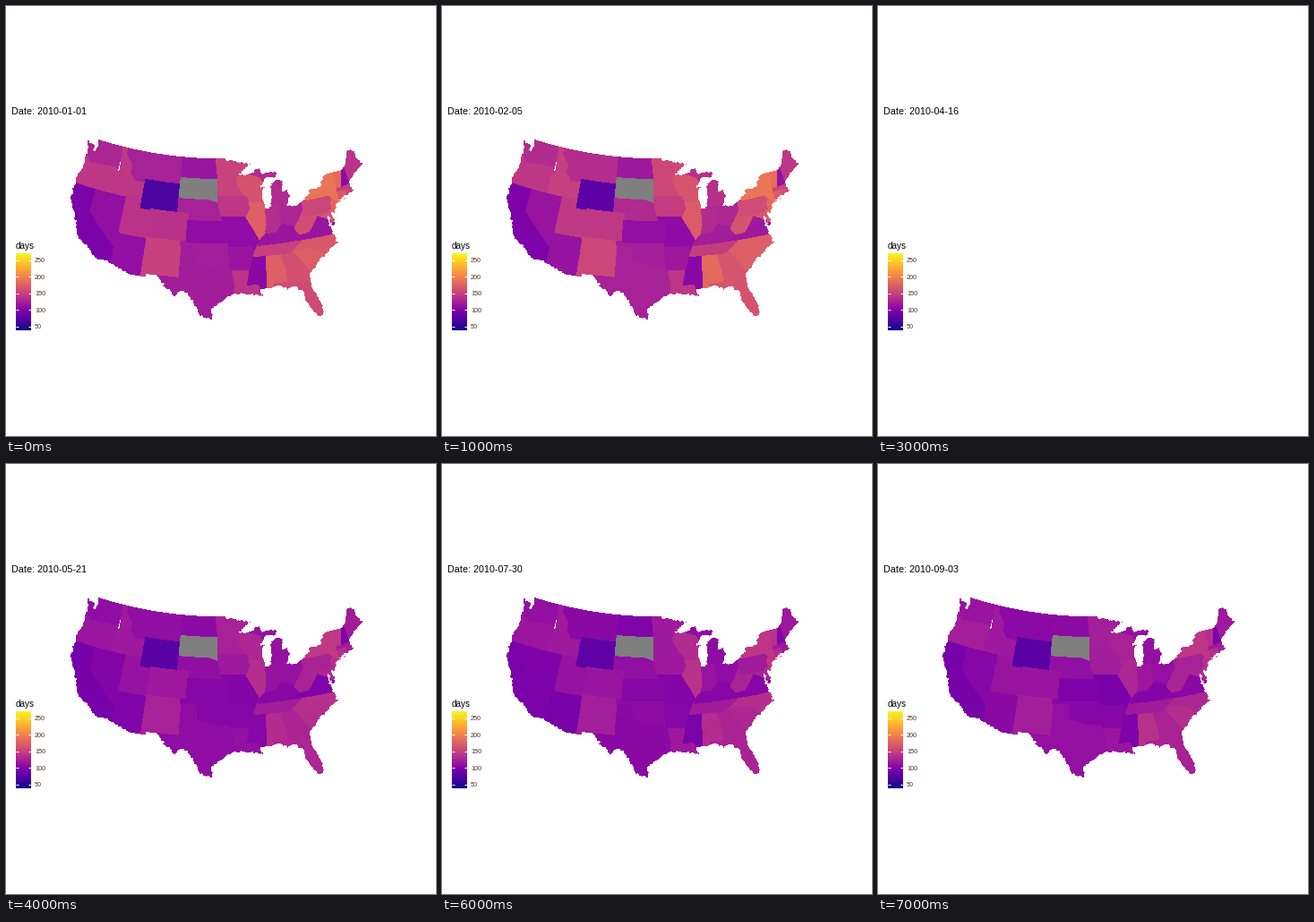
Recreate the animation shown at these times as a matplotlib script. Size 480 px wide and 480 px high, loop 8 s.

```python
import numpy as np
import matplotlib.pyplot as plt
from matplotlib.animation import FuncAnimation
from matplotlib.patches import PathPatch, Polygon
from matplotlib.path import Path

SIZE = 480
LOW, HIGH = 36.5, 269
STEPS = 8
BLANK = 3      # step without any data
PLASMA = plt.get_cmap("plasma")
rng = np.random.default_rng(4)

plt.rcParams["font.family"] = "Liberation Sans"
fig = plt.figure(figsize=(SIZE / 72, SIZE / 72), dpi=72, facecolor="white")
ax = fig.add_axes([0, 0, 1, 1])
ax.axis("off")


def albers(west, lat):
    """Equal-area conic projection to stage pixels, parallels 39 and 45."""
    s1, s2 = np.sin(np.radians([39, 45]))
    n = (s1 + s2) / 2
    c = 1 - s1 ** 2 + 2 * n * s1
    rho = 453 * np.sqrt(c - 2 * n * np.sin(np.radians(lat))) / n
    theta = n * np.radians(95.84 - west)
    return 240.6 + rho * np.sin(theta), rho * np.cos(theta) - 278


def trace(coords, rough=0):
    """Project a ring of (west, north) pairs; rough shakes slanted edges."""
    pts = np.array(coords, float).reshape(-1, 2)
    out = []
    for a, b in zip(pts, np.roll(pts, -1, axis=0)):
        shake = rough if np.abs(b - a).min() > 0 else 0
        steps = int(np.ceil(np.abs(b - a).max() / 0.25))
        for k in range(steps):
            out.append(albers(*(a + (b - a) * k / steps))
                       + rng.normal(0, shake, 2) * (k > 0))
    return out


def yearly(base):
    """Day counts per step: a slow winter rise, then a flatter, lower spread."""
    step = np.arange(STEPS)
    days = np.where(step < BLANK, base + 3 * step, 42 + 0.52 * base)
    return days + rng.normal(0, 2.5, STEPS) * (step > 0)


regions = []


def state(base, *coords):
    """Painted over its neighbours so far; the sea is cut away afterwards."""
    patch = ax.add_patch(Polygon(trace(coords), lw=0.5, antialiased=False))
    regions.append((patch, None if base is None else yearly(base)))


def box(base, w, s, e, n):
    state(base, w, n, e, n, e, s, w, s)


# West
box(140, 125, 42, 117, 47)
state(126, 125, 46.2, 123, 46.1, 122.8, 45.6, 119.3, 45.9, 117, 46, 117, 50, 125, 50)
box(108, 115, 31, 109.05, 37)
state(93, 125, 42, 120, 42, 120, 39, 114.6, 35, 114.5, 33, 114.7, 32, 125, 32)
box(122, 116.05, 44.4, 104.05, 50)
state(140, 117.04, 50, 116.05, 50, 116.05, 48, 114.4, 46.6, 114.5, 45.6,
      113.2, 44.5, 111.05, 44.5, 111.05, 42, 117.04, 42, 117, 44.2, 116.5, 45.6)
state(108, 120, 42, 114.04, 42, 114.04, 36.1, 114.7, 36, 114.6, 35, 120, 39)
box(137, 114.04, 37, 109.05, 42)
box(66, 111.05, 41, 104.05, 45)

# Plains
box(112, 104.05, 45.94, 96.6, 50)
box(None, 104.05, 42.6, 96.45, 45.94)
state(122, 104.05, 43, 98.4, 43, 96.4, 42.5, 95.3, 40, 102.05, 40, 102.05, 41,
      104.05, 41)
box(136, 109.05, 37, 102.05, 41)
box(119, 107, 25, 93.6, 36.5)
state(148, 109.05, 37, 103.05, 37, 103.05, 32, 106.6, 32, 106.6, 31, 109.05, 31)
state(120, 103, 37, 94.6, 37, 94.45, 33.7, 97, 33.8, 100, 34.5, 100, 36.5, 103, 36.5)

# Middle
box(130, 90.5, 41.73, 82, 48)
state(150, 97.2, 50, 89, 50, 89, 48, 92.1, 46.7, 92.8, 45.6, 91.2, 43.5,
      96.45, 43.5, 96.5, 46)
state(162, 92.8, 45.6, 92.1, 47, 90.4, 47, 90.4, 46.5, 88.1, 45.9, 87.6, 45.1,
      86.5, 45.1, 86.8, 42.5, 90.6, 42.5, 91.2, 43.5)
state(140, 96.5, 43.5, 91.2, 43.5, 90.2, 41.8, 91.4, 40.4, 95.8, 40.6, 96.4, 42.5)
state(172, 90.6, 42.5, 87, 42.5, 87.53, 39.3, 88, 37.9, 89.2, 37, 90.2, 38.7,
      91.4, 40.3, 90.2, 41.8)
state(132, 87.53, 41.8, 84.82, 41.73, 84.82, 39, 86, 38, 88, 37.9, 87.53, 39.3)
state(126, 84.82, 41.73, 83, 41.73, 80.52, 42.2, 80.6, 40.4, 82.5, 38.5, 84.82, 39.1)
state(112, 94.6, 36.5, 89.7, 36.5, 91.1, 33, 94.04, 33, 94.45, 33.7)
state(106, 95.8, 40.6, 91.6, 40.6, 91.4, 40.3, 90.2, 38.7, 89.2, 37, 89.6, 36,
      90.3, 36, 90.1, 36.5, 94.6, 36.5, 94.6, 39.1)
box(106, 102.05, 37, 94.6, 40)

# South
state(138, 94.04, 33, 91.1, 33, 91.6, 31, 89.7, 31, 89.5, 30, 88, 28, 94, 28, 93.6, 31)
box(156, 87.6, 24, 79, 31)
state(102, 91.1, 33, 90.3, 35, 88.2, 35, 88.4, 30, 89.5, 30, 89.7, 31, 91.6, 31)
state(172, 88.2, 35, 85.6, 35, 85, 32.3, 85, 31, 87.6, 31, 87.5, 30, 88.4, 30)
box(166, 84.3, 33.5, 75, 36.55)
state(160, 85.6, 35, 83.1, 35, 81, 32, 81, 30.6, 85, 30.7, 85, 32.3)
state(171, 83.2, 35, 82.3, 35.2, 81, 35.15, 79.7, 34.8, 78.5, 33.8, 78, 32, 81, 32)
state(148, 90.3, 35, 84.3, 35, 81.7, 36.6, 89.5, 36.5)
box(162, 79.5, 37.9, 75, 39.72)
state(112, 75, 36.55, 83.7, 36.6, 82, 37.5, 80.3, 37.5, 78.4, 39.4, 77, 38.8,
      76, 38, 75, 38)
state(112, 89.4, 36.5, 83.7, 36.6, 82, 37.5, 82.6, 38.5, 84.8, 39.1, 86, 38,
      88, 37.9, 89.2, 37)
state(158, 82.6, 38.3, 81.9, 37.4, 80.3, 37.5, 78.4, 39.4, 79.5, 39.2,
      79.5, 39.72, 80.52, 40.6, 81.7, 39.2)

# Northeast
box(152, 80.52, 39.72, 74.7, 42.3)
box(164, 75.79, 38.45, 75, 39.8)
state(178, 75.5, 39.5, 75.1, 40, 75.2, 40.8, 74.7, 41.35, 73.9, 41, 73.9, 38.8, 75, 38.8)
state(188, 79.76, 46, 73.35, 46, 73.5, 41, 71, 41.2, 72, 40, 73.9, 40.4, 74, 41,
      75.35, 42, 79.76, 42)
box(146, 73.4, 41.2, 69.5, 42.75)
box(168, 73.5, 41.1, 71.8, 42.05)
box(150, 71.8, 41.1, 71.2, 42.02)
state(180, 73.35, 45.1, 71.4, 45.1, 72.5, 42.73, 73.3, 42.73)
state(104, 71.5, 45.1, 71, 45.4, 70.7, 42.9, 72.5, 42.73)
state(138, 71.05, 48, 66, 48, 66, 43, 70.7, 43)

# Shoreline and land border
PACIFIC = [122.76, 49, 122.3, 47.9, 122.8, 47.3, 122.9, 48.1, 124.7, 48.4,
           124, 46.5, 124.1, 43.8, 124.5, 42.8, 124.2, 41.8, 124.35, 40.4,
           123.75, 39.2, 122.5, 37.7, 121.9, 36.7, 120.65, 34.6, 119.2, 34.15,
           117.12, 32.53]
SOUTH = [114.8, 32.5, 111.07, 31.33, 108.2, 31.33, 108.2, 31.78, 106.5, 31.78,
         104.7, 30, 103.15, 28.98, 102.4, 29.85, 101.4, 29.77, 100.3, 28.3,
         99.1, 26.4, 97.15, 25.95, 97.3, 27.6, 95.2, 29, 93.8, 29.7, 91.8, 29.5,
         89.2, 29.1, 89.5, 30.2, 86.3, 30.4, 85.3, 29.7, 84, 30.1, 82.8, 29,
         82.8, 27.8, 81.1, 25.15]
ATLANTIC = [80.3, 25.3, 80.05, 26.8, 81.3, 29.8, 81.3, 31.5, 79.3, 33.1,
            78, 33.9, 76.6, 34.7, 75.55, 35.25, 76, 36.9, 76.4, 39.2, 75.9, 37.3,
            75.1, 38.4, 75.5, 39.5, 74.9, 39, 74, 40.5, 72, 41, 73.6, 40.95,
            71.4, 41.4, 70, 41.65, 70.8, 42.4, 70.7, 43, 69, 44, 67, 44.8]
NORTH = [67.8, 45.7, 67.9, 47.1, 69.2, 47.45, 70, 46.7, 71, 45.3, 71.5, 45,
         75, 45, 76.3, 44.1, 76.3, 43.5, 79, 43.25, 78.9, 42.8, 81.7, 41.5,
         83.4, 41.7, 82.45, 43, 82.7, 44, 83.9, 43.7, 83.4, 45, 84.7, 45.75,
         86.2, 44.7, 86.2, 43, 86.8, 41.76, 87.6, 41.7, 87.8, 43, 87.3, 44.8,
         88, 44.55, 86.9, 45.75, 84, 46, 84.9, 46.7, 87.4, 46.5, 88, 47.4,
         90.5, 46.6, 92.1, 46.75, 89.6, 48, 93, 48.6, 94.6, 48.7, 95.15, 49.38,
         95.15, 49]
land = Path(trace(PACIFIC + SOUTH + ATLANTIC + NORTH, rough=0.75))
stage = Path([(0, 0), (SIZE, 0), (SIZE, SIZE), (0, SIZE), (0, 0)])
sea = Path.make_compound_path(stage, land)
ax.add_patch(PathPatch(sea, fc="white", lw=0, antialiased=False, zorder=2))

# Legend
ax.text(11, 271, "days", size=10)
ax.imshow(np.linspace(1, 0, 300)[:, None], cmap=PLASMA, aspect="auto",
          extent=(11, 28, 362, 276), zorder=3)
for value in range(50, 251, 50):
    y = 362.5 - 86 * (value - LOW) / (HIGH - LOW)
    for x in (11, 24.6):
        ax.plot([x, x + 3.4], [y, y], color="white", lw=1,
                solid_capstyle="butt", zorder=4)
    ax.text(32, y + 2.5, str(value), size=7.2, color="#57331f")

date = ax.text(6, 121, "", size=10.8)
ax.set_xlim(0, SIZE)
ax.set_ylim(SIZE, 0)


def update(step):
    day = np.datetime64("2010-01-01") + 35 * step
    date.set_text(f"Date: {day}")
    for patch, days in regions:
        patch.set_visible(step != BLANK)
        if days is None:
            patch.set_color("#7f7f7f")
        else:
            patch.set_color(PLASMA((days[step] - LOW) / (HIGH - LOW)))
    return [date]


anim = FuncAnimation(fig, update, frames=STEPS, interval=1000, repeat=True,
                     repeat_delay=0)
plt.show()
```
